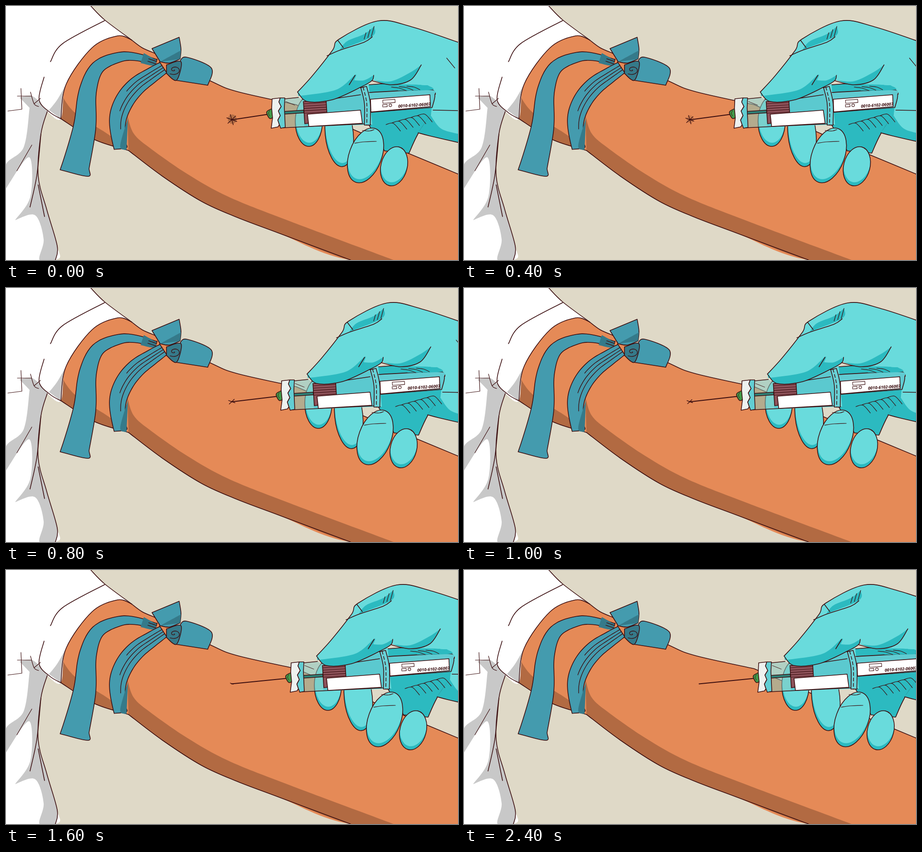
These frames come from a looping animation (997 px wide and 561 px high, 2.6 s). An HTML page with a canvas:

```html
<!DOCTYPE html>
<html lang="en">
<head>
<meta charset="utf-8">
<title>Blood draw</title>
<style>
html, body { margin: 0; width: 100%; height: 100%; overflow: hidden; background: #dfd9c7; }
canvas { display: block; }
</style>
</head>
<body>
<canvas id="stage" width="997" height="561"></canvas>
<script>
const ctx = document.getElementById('stage').getContext('2d');
const STEP = 200, STEPS = 13, SHIFT = 5.25;
const INK = '#3a0d0f', SKIN = '#e58a57', SKIN_DARK = '#b26a42', GREY = '#c8c8c8';
const BLUE = '#449bae', BLUE_DARK = '#357a8a', GLOVE = '#69dbdc', GLOVE_DARK = '#2cbac0';

// Contours shared by neighbouring shapes
const ARM_TOP = '277,75 300,92 327,104 / 452,166 510,189 640,218 / 889,326 / 997,371';
const ARM_BASE = '760,561 600,501 510,467 432,432 345,376 270,319';
const CUFF = '121,249 133,172 190,92 246,66 277,75';
const SHOULDER = '277,75 218,31 187,0';
const BODY = '109,561 113,530 90,450 71,375 77,283 91,233';
const THUMB_TOP = '1000,81 895,46 820,33 735,73 720,98 675,155 643,190';
const THUMB_BASE = '643,190 665,211 720,207 783,179 807,165 811,153';

const parse = text => text.trim().split(/\s+/).map(s => s.split(',').map(Number));

// Smooth curve through "x,y" points; "/" marks a sharp corner.
function curve(text) {
  const path = new Path2D();
  let last = null;
  for (const part of text.split('/')) {
    const p = parse(part);
    if (last) p.unshift(last);
    else path.moveTo(...p[0]);
    for (let i = 0; i < p.length - 1; i++) {
      const a = p[i - 1] || p[i], b = p[i], c = p[i + 1], d = p[i + 2] || c;
      path.bezierCurveTo(
        b[0] + (c[0] - a[0]) / 6, b[1] + (c[1] - a[1]) / 6,
        c[0] - (d[0] - b[0]) / 6, c[1] - (d[1] - b[1]) / 6, c[0], c[1]);
    }
    last = p[p.length - 1];
  }
  return path;
}

function fill(color, text) {
  ctx.fillStyle = color;
  ctx.fill(curve(text));
}

function line(text, width = 1.6) {
  ctx.strokeStyle = INK;
  ctx.lineWidth = width;
  ctx.stroke(curve(text));
}

function shape(color, text) {
  fill(color, text);
  line(text);
}

// Point at t (0..1) on a spline through the key points
function along(keys, t) {
  const n = keys.length - 1, i = Math.min(n - 1, Math.max(0, Math.floor(t * n))), u = t * n - i;
  const [a, b, c, d] = [-1, 0, 1, 2].map(k => keys[Math.min(n, Math.max(0, i + k))]);
  return [0, 1].map(k => b[k] + 0.5 * u * (c[k] - a[k]
    + u * (2 * a[k] - 5 * b[k] + 4 * c[k] - d[k] + u * (3 * (b[k] - c[k]) + d[k] - a[k]))));
}

// Line beside a spline; side -0.5 and 0.5 are the borders of the strap.
function beside({ keys, width }, side, from = 0, to = 1) {
  const out = [];
  for (let i = 0; i <= 24; i++) {
    const t = from + (to - from) * i / 24;
    const [x, y] = along(keys, t), [x0, y0] = along(keys, Math.max(0, t - 0.01));
    const [x1, y1] = along(keys, Math.min(1, t + 0.01));
    const k = width(t) * side / Math.hypot(x1 - x0, y1 - y0);
    out.push(`${x - (y1 - y0) * k},${y + (x1 - x0) * k}`);
  }
  return out.join(' ');
}

const strap = s => `${beside(s, 0.5)} / ${beside(s, -0.5, 1, 0)} / ${beside(s, 0.5, 0, 0)}`;

const TAIL = {
  keys: parse('331,125 290,113 250,113 202,136 180,190 173,270 150,369'),
  width: t => 14 + 49 * t ** 1.7
};
const LOOP = {
  keys: parse('347,136 318,155 290,175 266,202 250,235 246,268 252,315'),
  width: t => 27 + 14 * Math.sin(Math.PI * t)
};
const FLANGE = { keys: parse('789,179 797,215 797,263'), width: () => 13 };

function drawArm() {
  fill(SKIN, `${ARM_TOP} / 997,561 / ${ARM_BASE} / 195,295 121,249 / ${CUFF}`);
  fill(SKIN_DARK, `268,243 282,282 318,314 400,371 490,421 620,473 855,561 / ${ARM_BASE}`);
  fill(SKIN_DARK, '126,203 155,238 232,288 260,317 / 195,295 121,249');
  line(ARM_TOP);
  line(`${ARM_BASE} / 195,295 121,249`);
}

function drawShirt() {
  fill('#fff', `0,0 / 0,561 / ${BODY} / ${CUFF} / ${SHOULDER}`);
  fill(GREY, '132,174 124,210 121,249 / 95,230 / 113,207 132,174');
  fill(GREY, `30,202 60,200 92,233 / 91,233 77,283 71,375 90,450 113,530 109,561 / 74,561 83,515 64,462 20,473 / 54,420 51,334 0,403 / 0,350 39,312 52,225`);
  for (const s of [SHOULDER, CUFF, BODY, '98,123 125,83 218,32', '84,157 73,207 97,235 121,249',
    '71,395 85,465', '77,283 68,374 53,444']) line(s);
  for (const s of ['33,182 35,228 / 4,232', '25,199 56,199', '54,190 62,216 72,222', '76,204 62,216', '24,364 57,307']) line(s, 1.2);
}

function drawBand() {
  shape(BLUE, strap(TAIL));
  fill(BLUE_DARK, '304,104 331,119 / 328,132 297,126');
  shape(BLUE, strap(LOOP));
  fill(BLUE_DARK, '269,247 266,318 / 252,309 269,247');
  for (const side of [-0.2, 0, 0.2]) line(beside(LOOP, side, 0, 0.65 - side), 1.4);
  for (const side of [-0.2, 0.2]) line(beside(TAIL, side, 0, 0.08), 1.4);

  shape(BLUE, '322,94 382,69 / 386,95 384,117 / 360,126 340,123 / 322,94');
  fill(BLUE_DARK, '386,98 384,117 / 340,123 / 386,98');
  shape(BLUE, '383,123 398,113 453,137 445,175 / 374,164');
  shape(BLUE_DARK, '354,130 386,123 376,164 354,149 / 354,130');
  // Curl of the knot
  const curl = [];
  for (let a = 0; a < 9; a += 0.5) curl.push(`${371 + 1.8 * a * Math.cos(a)},${141 + 1.3 * a * Math.sin(a)}`);
  line(curl.join(' '), 1.3);
}

function drawMark(step) {
  if (step > 8) return;
  const r = 13 - 1.15 * step;
  ctx.fillStyle = `rgba(163,101,63,${Math.max(0, 0.75 - step * 0.18)})`;
  ctx.beginPath();
  ctx.ellipse(499, 250, r * 0.75, r * 0.8, 0, 0, 7);
  ctx.fill();
  // Strokes vanish one by one as the skin closes.
  const rays = 3 - Math.floor(step / 3);
  for (let i = 0; i < rays; i++) {
    const a = 0.35 - i * 1.1, x = Math.cos(a) * r * 0.9, y = Math.sin(a) * r * 0.9;
    line(`${498 - x},${251 - y} 498,251 ${498 + x},${251 + y}`, 1.4);
  }
}

// Fingertip with a shaded lower rim
function finger(x, y, rx, ry, tilt) {
  const tip = new Path2D();
  tip.ellipse(x, y, rx, ry, tilt, 0, 7);
  ctx.fillStyle = GLOVE_DARK;
  ctx.fill(tip);
  ctx.save();
  ctx.clip(tip);
  ctx.translate(1, -8);
  ctx.fillStyle = GLOVE;
  ctx.fill(tip);
  ctx.restore();
  ctx.strokeStyle = INK;
  ctx.lineWidth = 1.6;
  ctx.stroke(tip);
}

function drawFingers() {
  finger(668, 255, 30, 55, 0);
  shape(GLOVE_DARK, '800,174 895,168 935,174 / 950,215 909,282 889,325 / 835,320 / 800,262');
  finger(735, 282, 31, 73, -0.1);
  finger(793, 330, 36, 63, 0.35);
  finger(856, 354, 29, 44, 0.25);
  fill(GLOVE, '660,205 / 800,172 / 808,262 / 660,267');

  // Heel of the hand
  fill(GLOVE_DARK, '1000,302 935,287 909,280 / 943,230 / 1000,231');
  fill(GLOVE, '937,242 960,271 1000,283 / 1000,200 / 943,195');
  line('1000,302 935,287 909,280');
  line('942,230 1000,231');
  for (let i = 0; i < 6; i++) {
    const x = 838 + i * 14, y = 262 - i * 4;
    line(`${x},${y} ${x + 16},${y - 3} ${x + 32},${y + 14}`, 1.2);
  }
  for (let i = 0; i < 2; i++) line(`${769 + i * 17},${303 - i * 28} ${790 + i * 12},${300 - i * 24} ${817 - i * 5},${299 - i * 26}`, 1.2);
}

function drawTube() {
  shape('#60cbd1', '801,191 / 935,185 946,197 940,224 / 803,235');
  shape('#fff', '804,206 / 935,196 / 936,222 / 805,234 / 804,206');
  ctx.save();
  ctx.translate(831, 208);
  ctx.rotate(-0.07);
  ctx.strokeStyle = ctx.fillStyle = INK;
  ctx.lineWidth = 1.1;
  ctx.strokeRect(0, 0, 27, 7);
  ctx.strokeRect(-1, 10, 10, 5);
  ctx.beginPath();
  ctx.arc(16, 12.5, 3, 0, 7);
  ctx.stroke();
  ctx.font = 'italic 700 9.2px "Open Sans", sans-serif';
  ctx.fillText('0010-6102-06007', 33, 19);
  ctx.restore();
}

function drawSyringe(step) {
  drawTube();
  // Barrel and its content
  fill('rgba(137,201,192,.52)', '606,206 / 645,202 / 660,211 / 658,267 / 611,269');
  fill('rgba(70,172,188,.4)', '656,211 / 707,206 / 788,181 / 798,260 / 658,267');
  line('606,206 / 645,202');
  line('611,269 / 798,260');
  line('708,207 / 782,196');
  line('617,211 / 637,219', 1);
  shape('#2f8278', '611,233 / 657,230 / 657,236 / 611,239');
  shape('#8f535b', '656,211 / 706,208 / 708,238 / 667,241 / 667,259 / 659,260 / 656,211');
  for (let y = 216; y < 240; y += 5.2) line(`657,${y} / 707,${y - 3}`, 1.1);
  shape('#fff', '665,239 / 782,230 / 786,259 / 668,266 / 665,239');
  shape('#69d2d7', strap(FLANGE));
  ctx.setLineDash([7, 5]);
  line(beside(FLANGE, 0.1), 1.5);
  ctx.setLineDash([]);

  // The needle shows only outside the skin.
  const tip = Math.max(497, 455.5 + step * SHIFT) - step * SHIFT;
  line(`${tip},251.5 / 576,239.5`, 1.8);
  shape('#419b4b', '588,226 575,234 581,248 588,247');
  line('582,231 579,237 582,243', 1);

  // Cap torn along a zigzag
  let tear = '605,203';
  for (let i = 0; i < 6; i++) tear += ` / ${i % 2 ? 608 - i : 602 - i * 0.6},${212 + i * 10}`;
  shape('#edf1ef', `${tear} / 600,267 / 585,270 / 588,247 / 586,226 / 587,205 / 605,203`);
  shape('#62ced3', `${tear} / 606,270 / 616,268 / 614,225 / 615,203 / 605,203`);
}

function drawThumb() {
  fill(GLOVE, `${THUMB_TOP} / ${THUMB_BASE} / 811,164 860,172 915,174 / 945,187 955,212 1000,232`);
  fill(GLOVE_DARK, `${THUMB_BASE} / 790,164 768,164 / 770,152 728,185 645,199`);
  fill(GLOVE_DARK, '811,164 850,166 893,146 916,130 / 893,163 850,174 811,164');
  fill(GLOVE_DARK, '736,97 752,78 790,62 812,45 / 808,67 736,97');
  fill(GLOVE_DARK, '847,174 930,175 / 940,185 865,187');
  for (const s of [THUMB_TOP, THUMB_BASE, '708,110 738,97 790,80 808,68', '732,76 744,92',
    '770,153 757,174', '807,165 850,174 893,163 916,130']) line(s);
  for (let i = 0; i < 3; i++) line(`${812 - i * 9},${45 + i * 7} ${806 - i * 8},${67 + i * 3}`, 1.2);
  for (let i = 0; i < 3; i++) line(`${850 + i * 17},${179 - i} ${866 + i * 17},${181 - i} ${883 + i * 15},${187 - i}`, 1.2);
  line('972,115 990,137', 1.2);
}

function draw(step) {
  ctx.fillStyle = '#dfd9c7';
  ctx.fillRect(0, 0, 997, 561);
  drawArm();
  drawShirt();
  drawBand();
  drawMark(step);
  ctx.save();
  ctx.translate(step * SHIFT, 0);
  drawFingers();
  drawSyringe(step);
  drawThumb();
  ctx.restore();
}

ctx.lineJoin = ctx.lineCap = 'round';
const start = performance.now();
let shown = -1;

function tick() {
  const step = Math.floor((performance.now() - start) / STEP) % STEPS;
  if (step !== shown) draw(shown = step);
  requestAnimationFrame(tick);
}
tick();
</script>
</body>
</html>
```
